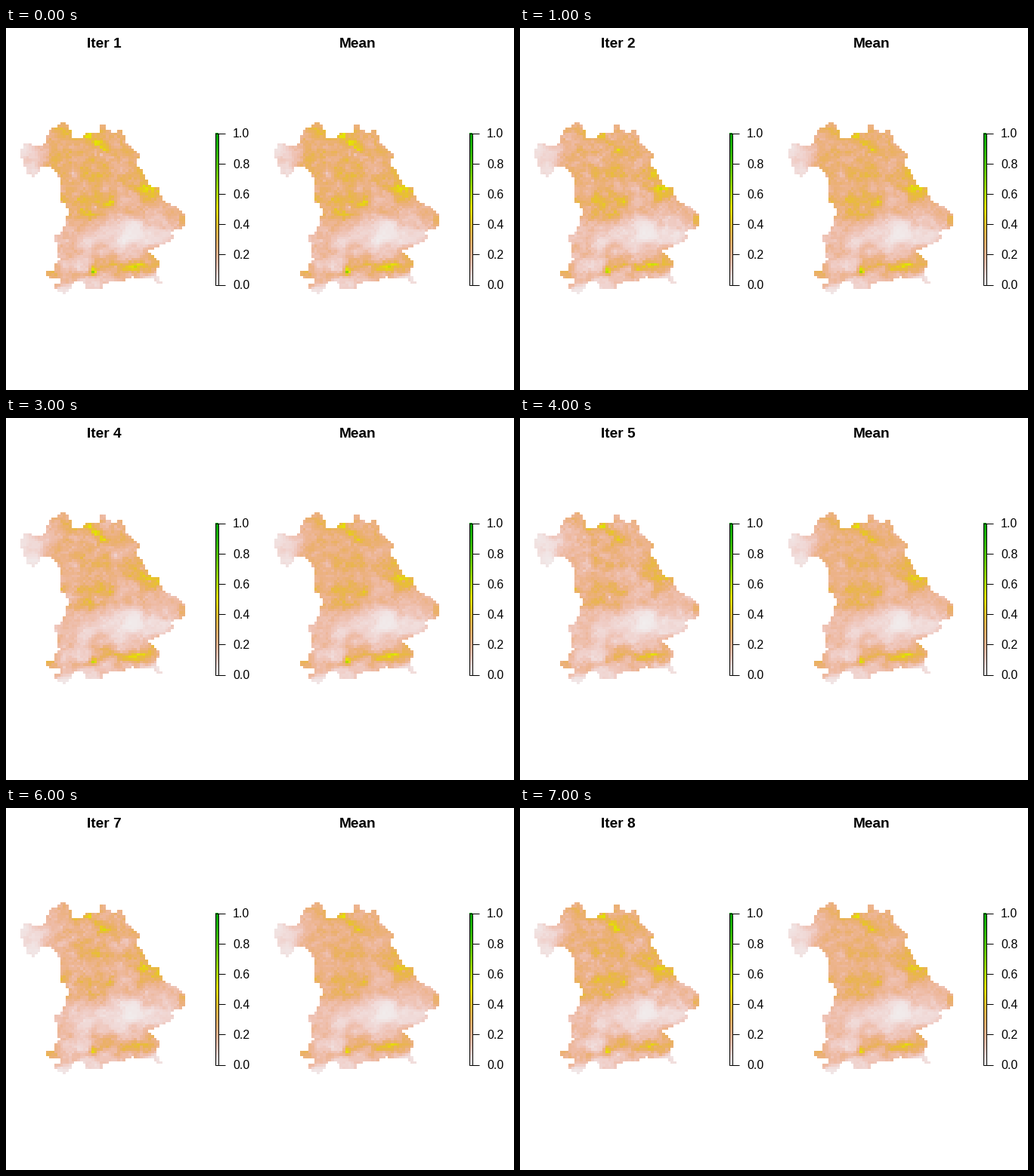
A matplotlib script for the animation above (8000 ms loop, 672 px wide and 480 px high).

```python
import colorsys

import matplotlib.pyplot as plt
import numpy as np
from matplotlib.animation import FuncAnimation
from matplotlib.path import Path

W, H = 672, 480
COLS, ROWS = 58, 66
LEFT, RIGHT, TOP, BOTTOM = 19, 236.5, 126, 353.5
SHIFT = 336
STEPS = 8
plt.rcParams["font.family"] = "Liberation Sans"

NORTH_EAST = [
    (19, 165), (23, 156), (30, 152), (36, 156), (46, 157), (54, 152), (53, 145),
    (57, 137), (65, 132), (72, 126), (78, 126), (83, 133), (88, 139), (84, 144),
    (92, 147), (102, 146), (104, 140), (117, 140), (120, 143), (125, 138),
    (124, 130), (130, 130), (132, 136), (142, 139), (155, 136), (157, 150),
    (165, 159), (172, 163), (176, 172), (171, 176), (173, 185), (180, 190),
    (186, 202), (192, 211), (203, 211), (203, 220), (206, 227), (214, 233),
    (226, 239), (236, 246), (236, 264), (230, 268), (222, 267), (219, 273),
    (222, 279), (214, 285), (198, 292), (189, 295), (191, 302), (200, 306),
]
SOUTH_WEST = [
    (203, 313), (199, 322), (201, 330), (206, 337), (203, 340), (196, 334),
    (188, 331), (180, 335), (168, 330), (158, 335), (142, 336), (130, 339),
    (127, 346), (113, 347), (104, 345), (103, 338), (94, 336), (86, 341),
    (84, 347), (79, 354), (75, 351), (64, 346), (66, 341), (71, 338),
    (70, 333), (54, 331), (53, 324), (62, 322), (65, 314), (70, 310),
    (68, 285), (61, 281), (66, 275), (74, 270), (79, 258), (82, 245),
    (80, 235), (72, 232), (73, 210), (68, 195), (62, 188), (56, 184),
    (46, 183), (43, 193), (35, 198), (27, 194), (27, 186), (23, 182),
]

# x, y, suitability
ANCHORS = [
    (25, 160, .03), (32, 190, .03), (42, 168, .05), (56, 170, .13),
    (72, 136, .25), (65, 155, .16), (78, 175, .19), (85, 205, .20),
    (95, 160, .23), (105, 185, .28), (125, 190, .26), (145, 155, .23),
    (150, 185, .20), (140, 210, .19), (118, 230, .29), (85, 245, .26),
    (108, 250, .28), (135, 245, .16), (160, 225, .14), (172, 200, .26),
    (188, 222, .29), (205, 240, .17), (225, 255, .15), (195, 255, .13),
]
SOUTH_ANCHORS = [
    (90, 265, .14), (75, 285, .14), (105, 283, .06), (135, 275, .06),
    (168, 270, .015), (195, 275, .05), (150, 285, .05), (120, 297, .12),
    (170, 298, .11), (78, 303, .15), (94, 313, .06), (62, 326, .23),
    (86, 328, .17), (112, 314, .24), (135, 313, .25), (170, 313, .27),
    (195, 312, .27), (160, 322, .26), (105, 340, .06), (130, 333, .12),
    (165, 332, .13), (200, 334, .05), (72, 344, .16), (82, 349, .03),
]

# x, y, x spread, y spread, height
HOT = {
    "north": [(110, 144, 7, 4, .24), (120, 153, 6, 4, .22), (128, 162, 5, 5, .30),
              (92, 147, 6, 3, .12), (140, 160, 6, 5, .08)],
    "ridge": [(146, 314, 9, 3, .19), (160, 319, 8, 3, .20), (174, 315, 9, 3, .18),
              (191, 313, 8, 3, .14), (128, 316, 8, 4, .08)],
    "spot": [(116, 323, 5, 5, .34), (104, 329, 9, 3, .06)],
    "east": [(188, 212, 7, 6, .12), (178, 202, 8, 12, .07), (200, 216, 6, 5, .08),
             (233, 255, 4, 9, .13), (73, 228, 4, 5, .18), (174, 180, 4, 12, .07)],
}
# One strength per iteration
STRENGTH = {
    "north": [1.0, .85, .95, .95, 1.15, .95, .9, .9],
    "ridge": [.75, 1.1, 1.2, .9, .85, .45, .5, .35],
    "spot": [1.15, .9, 1.05, .7, .1, .35, .5, .65],
    "east": [1.0, 1.3, .9, .9, 1.0, .9, .9, 1.0],
}
LEVEL = [1.06, 1.02, .98, .97, .9, .9, .95, 1.0]
WEST = [.07, .03, -.01, 0, -.02, -.01, -.01, .0]


def terrain(t):
    """Light grey through orange and yellow to green."""
    if t < .5:
        return colorsys.hsv_to_rgb(t / 3, 2 * t, .95 - .1 * t)
    return colorsys.hsv_to_rgb(t / 3, 1, .9 - .5 * (t - .5))


PALETTE = np.array([terrain(t) for t in np.linspace(0, 1, 255)])


def blur(a, n):
    for _ in range(n):
        a = (a + np.roll(a, 1, 0) + np.roll(a, -1, 0)
             + np.roll(a, 1, 1) + np.roll(a, -1, 1)) / 5
    return a


rng = np.random.RandomState(12)


def noise(n):
    a = blur(rng.randn(ROWS, COLS), n)
    return a / a.std()


cx = LEFT + (np.arange(COLS) + .5) * (RIGHT - LEFT) / COLS
cy = TOP + (np.arange(ROWS) + .5) * (BOTTOM - TOP) / ROWS
X, Y = np.meshgrid(cx, cy)
outline = Path(NORTH_EAST + SOUTH_WEST)
inside = outline.contains_points(np.c_[X.ravel(), Y.ravel()]).reshape(X.shape)


def base_field():
    """Inverse distance blend of the anchors over slightly warped positions."""
    wx, wy = X + 4 * noise(6), Y + 2 * noise(6)
    total = weight = 0
    for x, y, v in ANCHORS + SOUTH_ANCHORS:
        w = 1 / ((wx - x) ** 2 + 2 * (wy - y) ** 2 + 30) ** 2
        total, weight = total + w * v, weight + w
    return total / weight


def hot_field(spots):
    return sum(v * np.exp(-((X - x) / sx) ** 2 - ((Y - y) / sy) ** 2)
               for x, y, sx, sy, v in spots)


base = base_field()
hot = {name: hot_field(spots) for name, spots in HOT.items()}
texture = .09 * noise(0) + .10 * noise(2)
west = np.exp(-((X - 62) / 26) ** 2 - ((Y - 175) / 45) ** 2)


def iteration(i):
    land = base * LEVEL[i] + WEST[i] * west
    land = land + sum(hot[k] * STRENGTH[k][i] for k in hot)
    grain = texture + .06 * noise(0) + .11 * noise(3)
    return np.clip(land * (1 + grain), .005, .9)


fields = np.array([iteration(i) for i in range(STEPS)])
means = np.cumsum(fields, 0) / np.arange(1, STEPS + 1)[:, None, None]


def paint(field):
    rgb = PALETTE[np.round(field * 254).astype(int)]
    return np.dstack([rgb, inside.astype(float)])


fig = plt.figure(figsize=(W / 100, H / 100), dpi=100, facecolor="white")
ax = fig.add_axes([0, 0, 1, 1])
ax.axis("off")


def picture(data, x0, x1, y0, y1):
    return ax.imshow(data, extent=(x0, x1, y1, y0), interpolation="nearest",
                     aspect="auto")


def line(xs, ys):
    ax.plot(xs, ys, color="black", lw=.72, solid_capstyle="butt",
            solid_joinstyle="miter")


def legend(dx):
    x0, x1, y0, y1 = 276.5 + dx, 280.5 + dx, 139.5, 340.5
    picture(PALETTE[::-1, None, :], x0, x1, y0, y1)
    line([x0, x1, x1, x0, x0], [y0, y0, y1, y1, y0])
    for k in range(6):
        y = y1 - (y1 - y0) * k / 5
        line([x1, x1 + 9.5], [y, y])
        ax.text(300 + dx, y + 5.8, f"{k / 5:.1f}", fontsize=16 * .72,
                va="baseline")


def panel(dx, title):
    image = picture(paint(fields[0]), LEFT + dx, RIGHT + dx, TOP, BOTTOM)
    legend(dx)
    label = ax.text(129.5 + dx, 26, title, fontsize=19.2 * .72,
                    weight="bold", ha="center", va="baseline")
    return image, label


current, heading = panel(0, "Iter 1")
average, _ = panel(SHIFT, "Mean")
ax.set_xlim(0, W)
ax.set_ylim(H, 0)


def update(i):
    current.set_data(paint(fields[i]))
    average.set_data(paint(means[i]))
    heading.set_text(f"Iter {i + 1}")
    return current, average, heading


anim = FuncAnimation(fig, update, frames=STEPS, interval=1000, repeat=True,
                     repeat_delay=0)
plt.show()
```
